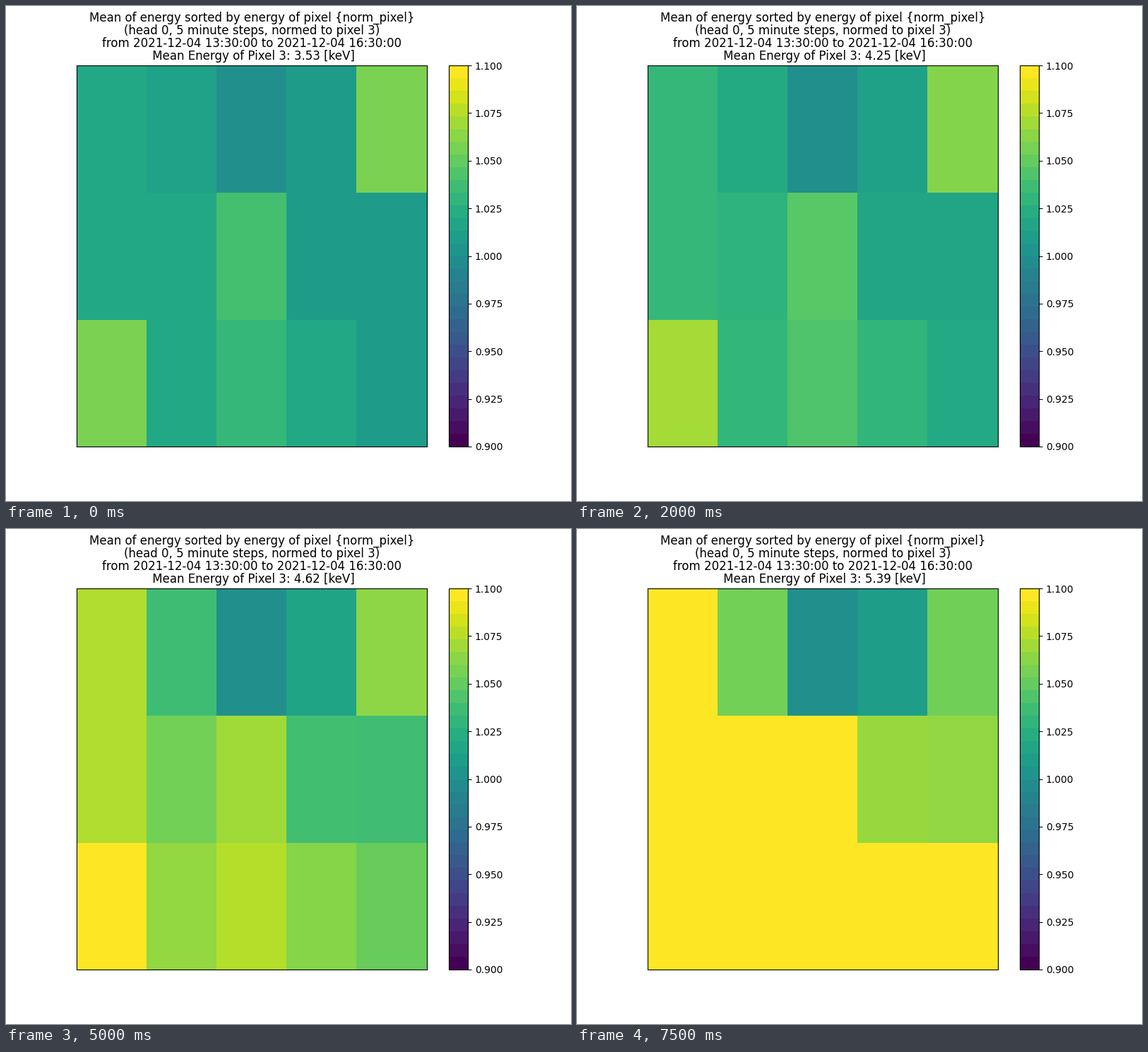
Animation of 800 by 700 pixels, one loop 8 s. Source, as a matplotlib script:

```python
import numpy as np
import matplotlib.pyplot as plt
from matplotlib.animation import FuncAnimation
from matplotlib.cm import ScalarMappable
from matplotlib.colors import Normalize

plt.rcParams["font.family"] = "DejaVu Sans"

STEPS = 16
INTERVAL = 500
ROWS, COLS = 3, 5
NORM_PIXEL = (0, 2)
WIDTH, HEIGHT = 496, 539  # plot area in pixels

HEADER = ("Mean of energy sorted by energy of pixel {{norm_pixel}}\n"
          "(head 0, 5 minute steps, normed to pixel 3)\n"
          "from 2021-12-04 13:30:00 to 2021-12-04 16:30:00\n"
          " Mean Energy of Pixel 3: {} [keV]")

# Key points over the steps: energy in keV, common shift, strength of drift
KEY_STEPS = [0, 2, 4, 9, 11, 13, 15]
ENERGY = [3.53, 3.6, 4.25, 4.27, 4.96, 5.03, 5.39]
SHIFT = [0, -0.02, 0.003, 0, 0.01, -0.005, -0.005]
DRIFT = [0, 0, 0.1, 0.27, 0.75, 0.9, 1.35]

# Excess over the norm pixel at the lowest energy
START = np.array([[20, 15, 0, 10, 60],
                  [20, 20, 40, 10, 10],
                  [60, 20, 33, 20, 10]]) / 1000

# Drift is strongest in the first column and decays to a floor set per row
FLOOR = np.array([[0], [0.045], [0.075]])
GAIN = FLOOR + (0.1 - FLOOR) * 0.35 ** np.arange(COLS)


def track(step, values):
    return np.interp(step, KEY_STEPS, values)


def grid(step):
    ratio = 1 + START + track(step, SHIFT) + GAIN * track(step, DRIFT)
    ratio[NORM_PIXEL] = 1
    return ratio[::-1]


def header(step):
    return HEADER.format(round(float(track(step, ENERGY)), 2))


fig, ax = plt.subplots(figsize=(8, 7), dpi=100)
norm = Normalize(0.9, 1.1)
viridis = plt.get_cmap("viridis")

# Cell edges fall on whole pixels
x_edges = WIDTH * np.arange(COLS + 1) // COLS
y_edges = HEIGHT * np.arange(ROWS + 1) // ROWS
mesh = ax.pcolormesh(x_edges, y_edges, grid(0), cmap=viridis, norm=norm)
ax.set(xlim=(0, WIDTH), ylim=(0, HEIGHT), xticks=[], yticks=[])
title = ax.set_title(header(0), linespacing=1.0)
fig.colorbar(ScalarMappable(norm, viridis.resampled(30)), ax=ax)


def update(step):
    mesh.set_array(grid(step))
    title.set_text(header(step))
    return mesh, title


anim = FuncAnimation(fig, update, frames=STEPS, interval=INTERVAL,
                     repeat=True, repeat_delay=0, blit=False)
plt.show()
```
